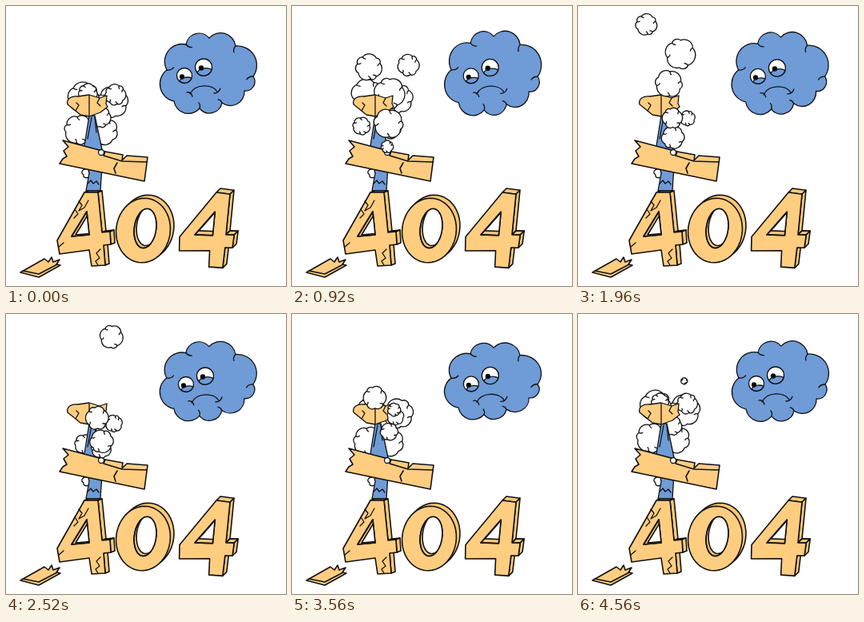
An HTML page for the animation above (4600 ms loop, 350 by 350 pixels).

```html
<!DOCTYPE html>
<html lang="en">
<head>
<meta charset="utf-8">
<title>404</title>
<style>
  html, body { margin: 0; width: 100%; height: 100%; overflow: hidden; background: #fff; }
  svg { display: block; width: 100vw; height: 100vh; }
  .ink { stroke: #111; stroke-width: 1.3; stroke-linejoin: round; stroke-linecap: round; }
  .ink * { vector-effect: non-scaling-stroke; }
  .wood { fill: #ffcd80; }
  .side { fill: #fbc877; }
  .blue { fill: #6f9bd7; }
  .white { fill: #fff; }
  .line { fill: none; }
  .bold { stroke-width: 1.6; }
</style>
</head>
<body>
<svg viewBox="0 0 350 350" class="ink">
  <g id="back"></g>
  <g id="hammer">
    <path class="white" d="M104 203C96 203 92 208 97 211C96 215 101 216 105 213Z"/>
    <path class="blue" d="M104 137L111 137L121 184L118 231L100 231L104 209L97 181Z"/>
    <path class="line" d="M107 139L102 166M111 139L113 158M102 222L106 218L109 222L113 219L116 223"/>
    <path class="wood" d="M77 123C75 116 82 112 90 113L104 111L117 115L126 112L125 122L127 126L118 133L104 138L93 136L87 131Z"/>
    <path class="line" d="M104 112V137M87 131L91 124L88 121M117 115L114 121L118 125"/>
  </g>
  <g id="front"></g>
  <g id="digits" class="bold"></g>
  <path class="line" d="M91 244L95 249L91 256L98 252L103 243M86 254L90 260L85 265M118 304L113 309L117 315L112 319L115 324M66 301L72 296"/>
  <g class="bold">
    <path class="wood" d="M71 168L124 182L146 186L145 193L151 187L177 189L173 219L67 197L71 191L76 188L72 181L78 176Z"/>
    <path class="line" d="M124 182L122 187L145 194L176 195M139 196L135 203L137 209"/>
    <path class="wood" d="M18 333L48 316L53 320L57 314L59 320L67 317L63 323L68 324L41 339Z"/>
    <path class="line" d="M21 331L41 335L64 323"/>
  </g>
  <g id="top"><circle class="white" cx="119" cy="183" r="3.5"/></g>
  <g id="cloud"></g>
  <g id="face">
    <circle class="white" cx="223" cy="87" r="9.5"/>
    <path class="blue" d="M217 94C219 89 227 88 232 90A9.5 9.5 0 0 1 217 94Z"/>
    <circle cx="220" cy="88.500" r="2.500"/>
    <circle class="white" cx="247" cy="76.500" r="10.500"/>
    <path class="blue" d="M239 83.500C241 78 251 76 257 79.500A10.500 10.500 0 0 1 239 83.500Z"/>
    <circle cx="244" cy="77.500" r="2.600"/>
    <path class="line" d="M230 110C236 97 258 97 264 107M226 108C229 107 232 109 233 113M260 109C264 109 267 106 268 103"/>
  </g>
</svg>
<script>
const LOOP = 4600;
const NS = 'http://www.w3.org/2000/svg';
const $ = id => document.getElementById(id);

function add(parent, tag, attrs = {}) {
  const el = document.createElementNS(NS, tag);
  for (const k in attrs) el.setAttribute(k, attrs[k]);
  return parent.appendChild(el);
}

// Block digits: side walls, front face, then a see-through hole.
const points = text => text.split(' ').map(p => p.split(',').map(Number));
const pathOf = pts => 'M' + pts.join('L') + 'Z';

function hole(g, d, dx, dy, id) {
  add(add(g, 'clipPath', { id }), 'path', { d });
  add(g, 'path', { d, class: 'side' });
  const clipped = add(g, 'g', { 'clip-path': `url(#${id})` });
  add(clipped, 'path', { d, class: 'white', transform: `translate(${dx} ${dy})` });
  add(g, 'path', { d, class: 'line' });
}

const FOUR = points('98,233 115,233 120,283 130,282 131,298 122,299 124,324 107,325 104,305 67,310 64,293');
const FOUR_HOLE = points('82,288 101,257 104,286');
// The last digit is the first one, moved and tilted.
const tilt = ([x, y]) => [x + 165 - 0.2 * (y - 233), y + 0.13 * (x - 98)];

function four(place, dx, dy, id) {
  const g = add($('digits'), 'g');
  const face = FOUR.map(place);
  face.forEach((a, i) => {
    const b = face[(i + 1) % face.length];
    if ((b[1] - a[1]) * dx - (b[0] - a[0]) * dy <= 0) return;
    const wall = [a, b, [b[0] + dx, b[1] + dy], [a[0] + dx, a[1] + dy]];
    add(g, 'path', { d: pathOf(wall), class: 'side' });
  });
  add(g, 'path', { d: pathOf(face), class: 'wood' });
  hole(g, pathOf(FOUR_HOLE.map(place)), dx, dy, id);
}

function oval(cx, cy, rx, ry) {
  return pathOf(Array.from({ length: 48 }, (_, i) => {
    const a = i * Math.PI / 24, x = rx * Math.cos(a), y = ry * Math.sin(a);
    return [cx + x - 0.14 * y, cy + y + 0.14 * x];
  }));
}

function zero() {
  const g = add($('digits'), 'g');
  add(g, 'path', { d: oval(176, 276.5, 33.5, 40), class: 'side' });
  add(g, 'path', { d: oval(171.5, 280.5, 33.5, 40), class: 'wood' });
  hole(g, oval(174, 278, 13.5, 24.5), 3, -3, 'h0');
}

four(p => p, 5, -2, 'h1');
zero();
four(tilt, 5, -5, 'h2');

// A round lobe between each pair of cusps, with seams curling inwards.
function blob(g, cusps, fill, round, curl) {
  const cx = cusps.reduce((s, p) => s + p[0], 0) / cusps.length;
  const cy = cusps.reduce((s, p) => s + p[1], 0) / cusps.length;
  let edge = `M${cusps[0]}`, seams = '';
  cusps.forEach(([x, y], i) => {
    const [nx, ny] = cusps[(i + 1) % cusps.length];
    const r = Math.hypot(nx - x, ny - y) * round;
    edge += `A${r} ${r} 0 0 1 ${nx} ${ny}`;
    const ux = (cx - x) * curl, uy = (cy - y) * curl;
    if (i % 3 < 2) seams += `M${x} ${y}q${ux * 0.7} ${uy * 0.7} ${ux + uy * 0.5} ${uy - ux * 0.5}`;
  });
  add(g, 'path', { d: edge + 'Z', class: fill });
  add(g, 'path', { d: seams, class: 'line' });
}

blob($('cloud'), points('201,80 225,48 254,40 287,50 309,88 298,106 270,121 242,128 210,119'), 'blue', 0.55, 0.15);

// A puff drifts from one spot by [dx, dy], speeding up, while it swells and fades.
const puffs = [];
function puff(layer, born, life, [x, y], [dx, dy], size) {
  const el = add($(layer), 'g');
  const seed = puffs.length + 1, n = 6 + seed % 2;
  const cusps = Array.from({ length: n }, (_, i) => {
    const a = (i + 0.22 * Math.sin(seed * 3 + i * 2.4)) * 2 * Math.PI / n + seed;
    return [0.87 * Math.cos(a), 0.87 * Math.sin(a)];
  });
  blob(el, cusps, 'white', 0.6, 0.25);
  puffs.push({ el, born, life, x, y, dx, dy, size });
}

// Billows that hang behind the hammer
[[98, 163, 19], [122, 163, 18], [133, 126, 20], [101, 119, 20]].forEach(([x, y, r], i) =>
  puff('back', 2300 + 250 * i, 3400, [x, y], [i % 3 ? 0 : -12, -14], r));

// Smoke that breaks loose and rises
puff('back', 4100, 2100, [134, 122], [20, -83], 14);
puff('back', 4400, 3000, [118, 142], [16, -130], 20);
puff('back', 4400, 2450, [103, 112], [-21, -106], 17);
puff('front', 4650, 2350, [124, 172], [-14, -100], 19);

// Small puffs that climb the handle
puff('front', 2000, 1000, [119, 174], [0, -16], 13);
puff('front', 1300, 2500, [118, 168], [4, -24], 15);
puff('front', 1500, 2900, [138, 142], [-14, -22], 11);
puff('front', 1500, 3000, [120, 145], [-28, -68], 15);
puff('front', 3300, 1300, [127, 124], [6, -42], 9);
puff('front', 3600, 600, [106, 90], [0, -12], 7);
puff('top', 300, 1100, [119, 183], [0, -16], 8);

function draw(t) {
  for (const p of puffs) {
    const u = ((t - p.born + LOOP) % LOOP) / p.life;
    const r = u < 1 ? p.size * Math.sqrt(1 - (2 * u - 1) ** 4) : 0;
    const go = u ** 1.4;
    p.el.style.display = r > 0.3 ? '' : 'none';
    p.el.setAttribute('transform', `translate(${p.x + p.dx * go} ${p.y + p.dy * go}) scale(${r})`);
  }
  // The sad cloud breathes while its face drifts slightly.
  const a = 2 * Math.PI * t / LOOP;
  const breath = 1 + 0.05 * Math.sin(a);
  $('cloud').setAttribute('transform', `translate(${252 + Math.cos(2 * a)} 83) scale(1 ${breath}) translate(-253 -83)`);
  $('face').setAttribute('transform', `translate(${1 - Math.cos(a)} ${0.5 - 0.5 * Math.cos(a)})`);
}

const start = performance.now();
function tick() {
  draw((performance.now() - start) % LOOP);
  requestAnimationFrame(tick);
}
tick();
</script>
</body>
</html>
```
